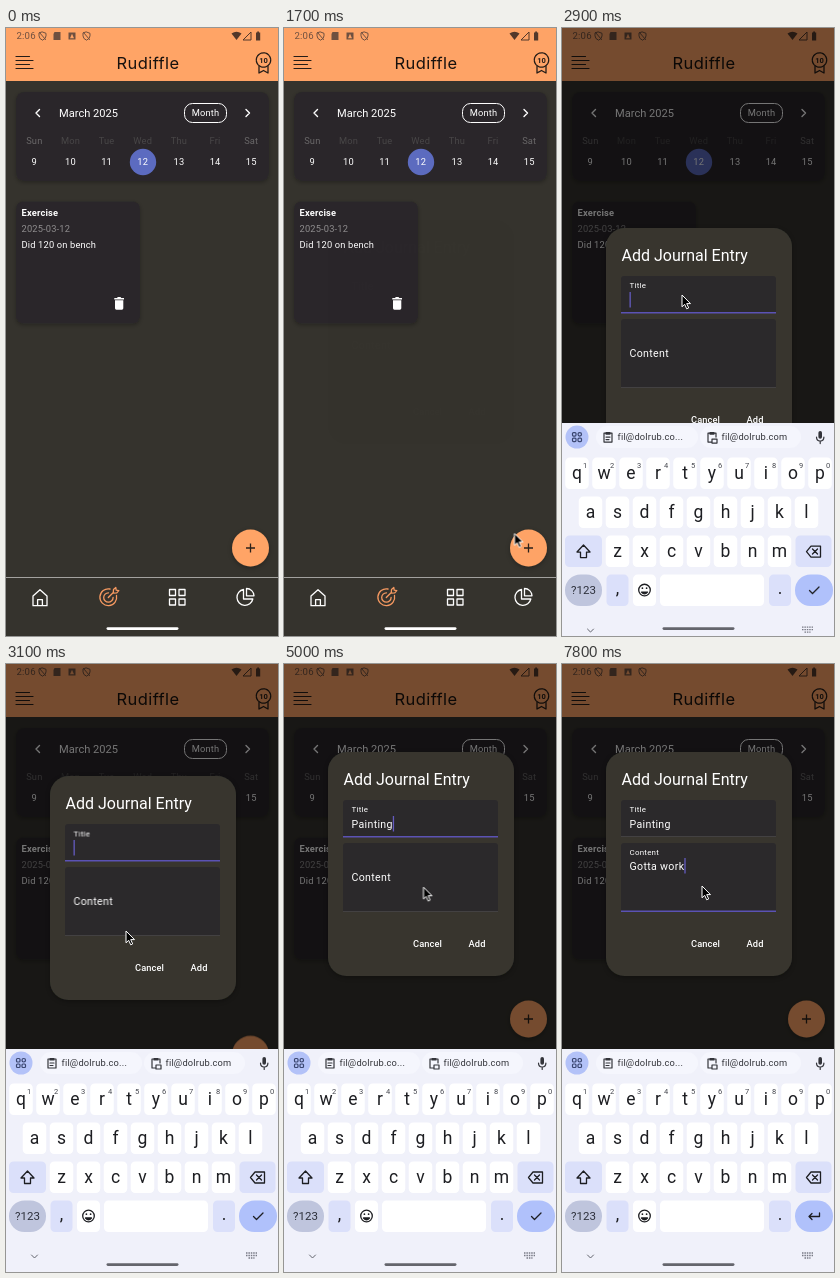
These frames come from a looping animation (272x608 px, 8000 ms). An HTML page:

```html
<!DOCTYPE html>
<html lang="en">
<head>
<meta charset="utf-8">
<title>Journal entry</title>
<style>
html, body { margin: 0; width: 100%; height: 100%; overflow: hidden; background: #35332d; }
svg { display: block; width: 272px; height: 608px; }
text { font-family: Roboto, "Noto Sans", sans-serif; white-space: pre; }
.body { font-size: 9.3px; letter-spacing: .17px; fill: #fff; }
.field { font-size: 10.6px; letter-spacing: .33px; fill: #fff; }
.button { font-size: 9.3px; font-weight: 500; letter-spacing: .07px; fill: #fff; }
.mid { text-anchor: middle; }
.line { fill: none; stroke-linecap: round; stroke-linejoin: round; }
.key { font-size: 17.5px; fill: #1d1e22; text-anchor: middle; }
.digit { font-size: 7.5px; fill: #44464e; text-anchor: middle; }
.caps .key { text-transform: uppercase; }
.caps #shift { fill: #1d1e22; }

.run { animation: 8s linear infinite; }
#dim { animation-name: fade; }
#dialog { animation-name: fade, lift; animation-duration: 8s, 8s; }
#fab { animation-name: fab; }
#keyboard { animation-name: slide; }
#pill { animation-name: pill; }
#titleLabel { animation-name: titleLabel; }
#bodyLabel { animation-name: bodyLabel; }
#titleLine { animation-name: titleLine; }
#bodyLine, #enter { animation-name: second; }
#check { animation-name: first; }
#pointer { animation-name: pointer; }

@keyframes fade { 0%, 21.25% { opacity: 0; } 23.75%, 100% { opacity: 1; } }
@keyframes lift {
  0%, 33.75% { transform: translateY(192px); }
  35%, 37.5% { transform: translateY(200px); animation-timing-function: ease-out; }
  39.6%, 100% { transform: translateY(88px); }
}
@keyframes fab {
  0%, 37.5% { transform: none; animation-timing-function: ease-out; }
  39.6%, 100% { transform: translateY(-165px); }
}
@keyframes slide {
  0%, 33.75% { transform: translateY(223px); animation-timing-function: cubic-bezier(.215, .61, .355, 1); }
  37.5%, 100% { transform: none; }
}
@keyframes pill { 0%, 34% { fill: #fff; } 34.5%, 100% { fill: #64656c; } }
@keyframes titleLabel {
  0%, 31.25% { transform: translate(67.5px, 70px); animation-timing-function: ease-out; }
  33.4%, 100% { transform: translate(67.5px, 60px) scale(.75); }
}
@keyframes bodyLabel {
  0%, 63.75% { transform: translate(67.5px, 129px); animation-timing-function: ease-out; }
  65.9%, 100% { transform: translate(67.5px, 103px) scale(.75); }
}
@keyframes titleLine { 0%, 31.24% { opacity: 0; } 31.25%, 63.74% { opacity: 1; } 63.75%, 100% { opacity: 0; } }
@keyframes first { 0%, 64.99% { opacity: 1; } 65%, 100% { opacity: 0; } }
@keyframes second { 0%, 64.99% { opacity: 0; } 65%, 100% { opacity: 1; } }
@keyframes pointer {
  0%, 8.74% { transform: translate(276px, 400px); }
  8.75% { transform: translate(272px, 400px); animation-timing-function: ease-out; }
  15%, 21.25% { transform: translate(230.5px, 505.5px); animation-timing-function: ease-in-out; }
  28.75% { transform: translate(119px, 268px); }
  31.25%, 58.75% { transform: translate(120px, 267px); animation-timing-function: ease-in-out; }
  63%, 100% { transform: translate(140px, 222px); }
}
</style>
</head>
<body>
<svg viewBox="0 0 272 608">
  <defs>
    <filter id="shadow" x="-20%" y="-20%" width="140%" height="150%">
      <feDropShadow dx="0" dy="1.5" stdDeviation="2" flood-opacity=".3"/>
    </filter>
  </defs>

  <rect width="272" height="608" fill="#35332d"/>
  <rect width="272" height="53" fill="#ffa466"/>

  <!-- status bar -->
  <g fill="#6f5040">
    <text x="10.5" y="11.3" font-size="9.6" letter-spacing=".2">2:06</text>
    <path d="M48.5 4h4l2 0v8h-7V6z"/>
    <path d="M62.5 4.5h7v7h-7z"/>
    <g class="line" stroke="#6f5040">
      <path d="M36.5 4l3.5 1.3v2.5q0 3-3.5 4.4q-3.500-1.400-3.500-4.400V5.300zM33.500 4.500l6 7"/>
      <path d="M80.500 4l3.500 1.300v2.500q0 3-3.500 4.400q-3.500-1.400-3.500-4.400V5.300zM77.500 4.500l6 7"/>
    </g>
    <path d="M66 5.700l2 4.600h-4z" fill="#ffa466"/>
  </g>
  <g fill="#53382a">
    <path d="M225.500 5.500q5-3.500 10 0l-5 6.500z"/>
    <path d="M245 4v8h-8z" fill="none" stroke="#53382a"/>
    <path d="M250 4.500h1.200v-1h1.800v1h1.200v8H250z"/>
  </g>

  <!-- app bar -->
  <path class="line" d="M10 28.500h13.500M10 32.500h17M10 36.500h13.500M10 40.500h17" stroke="#251c17" stroke-width="1.200"/>
  <text class="mid" x="142" y="40.700" style="font:400 16.500px Inter,'Open Sans',sans-serif;letter-spacing:.4px" fill="#17110e">Rudiffle</text>
  <g class="line" stroke="#251c17" stroke-width="1.300">
    <circle cx="257.500" cy="32" r="7.200" stroke-dasharray="3.600 .9"/>
    <path d="M253 38.500v6.500l4.500-2.500l4.500 2.500v-6.500"/>
  </g>
  <text class="mid" x="257.500" y="34.800" font-size="7.500" font-weight="700" fill="#251c17">10</text>

  <!-- calendar -->
  <rect x="10" y="64" width="253" height="89" rx="8" fill="#2a2829" filter="url(#shadow)"/>
  <path class="line" d="M33.500 81.500l-3.500 3.500l3.500 3.500M240 81.500l3.500 3.500l-3.500 3.500" stroke="#fff" stroke-width="1.400"/>
  <text x="53" y="88.800" font-size="11.100" fill="#fff">March 2025</text>
  <rect x="178.500" y="75.500" width="42" height="19" rx="8" fill="none" stroke="#fff"/>
  <text class="body mid" x="199.500" y="88.400">Month</text>
  <circle cx="137" cy="134" r="13.200" fill="#5c6bc0"/>
  <g id="week"></g>

  <!-- journal card -->
  <rect x="10" y="173.500" width="124" height="122" rx="7" fill="#2a2829" filter="url(#shadow)"/>
  <text class="body" x="15.500" y="188.300" font-weight="700">Exercise</text>
  <text class="body" x="15.500" y="204.300" style="fill:#8f8d8e">2025-03-12</text>
  <text class="body" x="15.500" y="220.300">Did 120 on bench</text>
  <path d="M108.300 270h2.700l.8-.9h2.700l.8.9h2.700v1.400h-9.700zM109 272.200h8.300v8.100q0 1.400-1.400 1.400h-5.500q-1.400 0-1.400-1.400z" fill="#fff"/>

  <!-- bottom bar -->
  <path d="M0 549.500h272" stroke="#a3a29f"/>
  <g class="line" stroke="#fff" stroke-width="1.300">
    <path d="M27 568l7-6.300l7 6.300v9.700H27zM31.600 577.700v-6h4.800v6"/>
    <path d="M163.500 561.500h6v6h-6zM173 561.500h6v6h-6zM163.500 571h6v6h-6zM173 571h6v6h-6z"/>
    <path d="M237.500 561.500a8 8 0 1 0 9.300 9.500h-9.300zM240.500 560.500v7.300h7.500a7.500 7.500 0 0 0-7.500-7.300z"/>
    <g stroke="#f79a61">
      <path d="M104 561a8.400 8.400 0 1 0 6.500 6.500M102.500 564.800a4.700 4.700 0 1 0 4.600 4.700"/>
      <path d="M102.300 569.500l5-5l.2-3l2.300-2l.4 2.700l2.600.4l-2 2.300l-3.300.2"/>
    </g>
  </g>
  <g id="fab" class="run">
    <circle cx="244.500" cy="520" r="18.500" fill="#ffa466" filter="url(#shadow)"/>
    <path d="M240 520h9M244.500 515.500v9" stroke="#2b211b" stroke-width="1.300"/>
  </g>

  <rect id="dim" class="run" width="272" height="608" fill="#000" fill-opacity=".54"/>

  <g id="dialog" class="run">
    <rect x="44" width="186" height="224" rx="18.500" fill="#37362f" filter="url(#shadow)"/>
    <text x="59.500" y="32.600" font-size="16" fill="#fff">Add Journal Entry</text>
    <path d="M59 84.500V51q0-3 3-3h149q3 0 3 3v33.500zM59 159.500V94q0-3 3-3h149q3 0 3 3v65.500z" fill="#2b292b"/>
    <path d="M59 84.500h155M59 159.500h155" stroke="#4b494c" stroke-width=".7"/>
    <path id="titleLine" class="run" d="M59 84.800h155" stroke="#5b52b4" stroke-width="1.400"/>
    <path id="bodyLine" class="run" d="M59 159.300h155" stroke="#5b52b4" stroke-width="1.400"/>
    <text id="titleLabel" class="field run">Title</text>
    <text id="bodyLabel" class="field run">Content</text>
    <text id="title" class="field" x="67.500" y="76"></text>
    <text id="entry" class="field" x="67.500" y="118"></text>
    <rect id="caret" width="1.300" height="15.500" fill="#645bc0"/>
    <text class="button mid" x="143.500" y="195.300">Cancel</text>
    <text class="button mid" x="193" y="195.300">Add</text>
  </g>

  <g id="keyboard" class="run">
    <rect y="385" width="272" height="460" fill="#f0f1fa"/>
    <rect x="34" y="388" width="102" height="22" rx="11" fill="#f5f6fd"/>
    <rect x="138" y="388" width="101" height="22" rx="11" fill="#f5f6fd"/>
    <circle cx="15" cy="399" r="11.500" fill="#b3c2f8"/>
    <g class="line" stroke="#3a4670" stroke-width="1.200">
      <rect x="10.500" y="394.500" width="3.500" height="3.500" rx="1"/>
      <rect x="16" y="394.500" width="3.500" height="3.500" rx="1.700"/>
      <rect x="10.500" y="400" width="3.500" height="3.500" rx="1"/>
      <rect x="16" y="400" width="3.500" height="3.500" rx="1"/>
    </g>
    <g class="line" stroke="#33343a" stroke-width="1.200">
      <path id="clip" d="M42 395h8v9h-8zM44 394.500h4v1.500h-4zM44 399h4M44 401.500h3"/>
      <path d="M150 404h-4v-9h8v4M148 394.500h4v1.500h-4zM150 401h5v4h-5z"/>
      <path d="M254.500 399q0 4 3.700 4t3.700-4M258.200 403v2.500"/>
    </g>
    <rect x="256.400" y="393" width="3.600" height="7.800" rx="1.800" fill="#33343a"/>
    <g font-size="9.300" letter-spacing=".2" fill="#33343a">
      <text x="55.500" y="402.300">fil@dolrub.co...</text>
      <text x="159.500" y="402.300">fil@dolrub.com</text>
    </g>
    <g id="keys"></g>
    <g class="line" stroke="#1d1e22" stroke-width="1.300">
      <path id="shift" d="M21.500 507l6.500 7h-3.500v5.500h-6V514H15z"/>
      <path d="M249 508h9.500v11H249l-4.500-5.500zM250.500 511l5 5M255.500 511l-5 5"/>
      <circle cx="82.500" cy="552" r="5.800"/>
      <path d="M79.500 554q3 3.500 6 0z" fill="#1d1e22"/>
      <path d="M80.400 550v.2M84.600 550v.2" stroke-width="1.700"/>
      <path id="check" class="run" d="M247.500 552.500l3 3l6.500-6.500"/>
      <path id="enter" class="run" d="M257.500 549v3.500h-10.500M250 549.500l-3 3l3 3"/>
      <path d="M25.500 591l3 3l3-3" stroke="#62646d" stroke-width="1"/>
    </g>
    <path d="M240 589h11M240 591.500h11M242.500 594h6" stroke="#777984" stroke-width="1.300" stroke-dasharray="1.500 .9"/>
  </g>

  <rect id="pill" class="run" x="100.500" y="599.200" width="72" height="2.800" rx="1.400"/>
  <path id="pointer" class="run" d="M0 0v11.800l2.700-2.500l2 4.500l2-.9l-2-4.300h3.800z" fill="#000" stroke="#fff" stroke-width="1"/>
</svg>
<script>
const $ = id => document.getElementById(id);

$('week').innerHTML = ['Sun', 'Mon', 'Tue', 'Wed', 'Thu', 'Fri', 'Sat'].map((day, i) => {
  const x = 28.3 + i * 36.15;
  const tone = i % 6 ? '#484647' : '#6a6869';
  return `<text class="body mid" x="${x}" y="116.3" style="fill:${tone}">${day}</text>
    <text class="body mid" x="${x}" y="137.4">${9 + i}</text>`;
}).join('');

const cap = (x, y, w, fill = '#fff', r = 4.5) =>
  `<rect x="${x - w / 2}" y="${y}" width="${w}" height="31.500" rx="${r}" fill="${fill}"/>`;
const letters = (row, x0, y) => [...row].map((c, i) => {
  const x = x0 + i * 27;
  const digit = y < 420 ? `<text class="digit" x="${x + 8}" y="${y + 10}">${(i + 1) % 10}</text>` : '';
  return cap(x, y, 23.5) + `<text class="key" x="${x}" y="${y + 21.5}">${c}</text>` + digit;
}).join('');

const soft = '#dbe0fa';
$('keys').innerHTML =
  letters('qwertyuiop', 15, 419.5) + letters('asdfghjkl', 28.5, 458.5) + letters('zxcvbnm', 55.5, 497.5) +
  cap(21.5, 497.5, 37, soft) + cap(251.5, 497.5, 36, soft) +
  cap(21.5, 536.5, 37, '#bfc5dd', 15.5) + cap(55.5, 536.5, 22, soft) + cap(82.5, 536.5, 23) +
  cap(150, 536.5, 104) + cap(218, 536.5, 22, soft) + cap(252, 536.5, 38, '#b0c1fb', 15.5) +
  '<text class="mid" x="21.500" y="556.300" font-size="11.500" fill="#2c2f3a">?123</text>' +
  '<text class="key" x="55.500" y="556">,</text><text class="key" x="218" y="556">.</text>';

// Moments in ms at which each character appears
const titleTimes = [3450, 3520, 3600, 3680, 3740, 3800, 3900, 4000];
const entryTimes = [5900, 6000, 6100, 6200, 6500, 6700, 6900, 7200, 7400, 7600, 7800];
const blinks = [[3150, 3400], [4400, 4900], [5600, 5800]];
const shifts = [[3400, 3450], [5800, 5900]];

const inside = (spans, t) => spans.some(([a, b]) => t >= a && t < b);
const type = (node, text, times, t) => {
  const shown = text.slice(0, times.filter(at => at <= t).length);
  if (node.textContent !== shown) node.textContent = shown;
};
const clock = $('pointer').getAnimations()[0];

function draw() {
  const t = (clock.currentTime || 0) % 8000;
  const second = t >= 5100;
  const node = second ? $('entry') : $('title');
  type($('title'), 'Painting', titleTimes, t);
  type($('entry'), 'Gotta work ', entryTimes, t);
  const width = node.textContent ? node.getComputedTextLength() : 0;
  $('caret').setAttribute('x', 67.5 + width);
  $('caret').setAttribute('y', second ? 106 : 64);
  $('caret').style.opacity = t < 2600 || inside(blinks, t) ? 0 : 1;
  $('keyboard').classList.toggle('caps', inside(shifts, t));
  requestAnimationFrame(draw);
}
draw();
</script>
</body>
</html>
```
